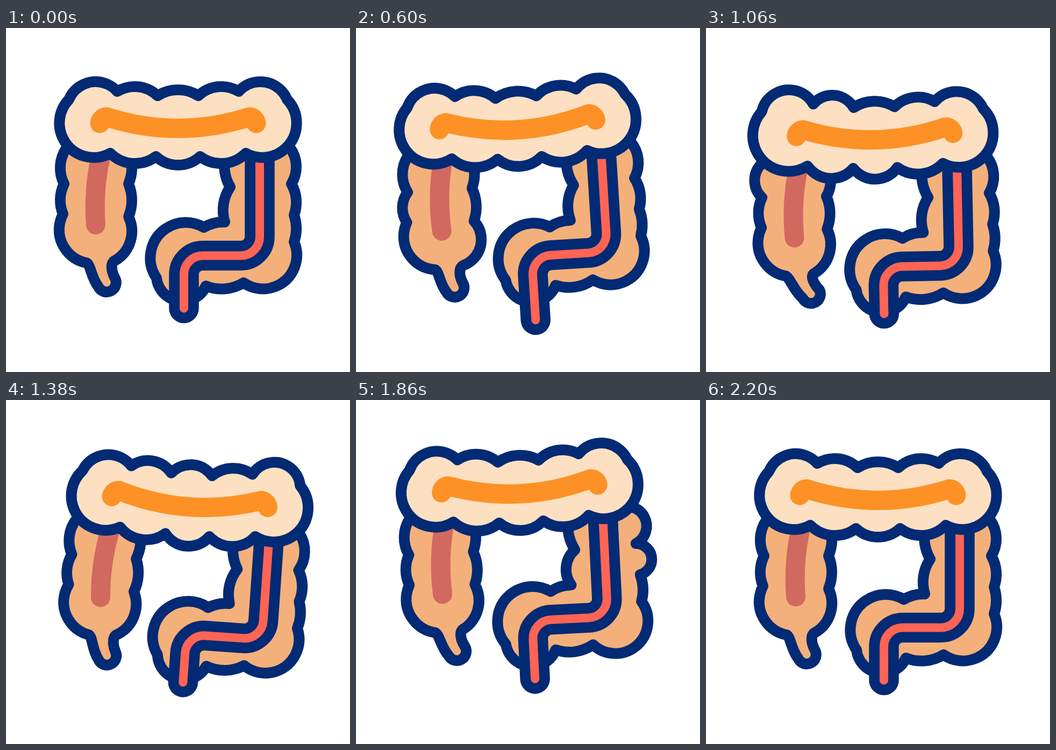
An HTML page with a canvas that plays this animation: 640 px wide and 640 px high, repeating every 2400 ms.

```html
<!DOCTYPE html>
<html lang="en">
<head>
<meta charset="utf-8">
<title>Colon</title>
<style>
html, body { margin: 0; width: 100%; height: 100%; overflow: hidden; background: #fff; }
canvas { display: block; width: 640px; height: 640px; }
</style>
</head>
<body>
<canvas id="stage"></canvas>
<script>
const LOOP = 2400, STEP = 20;
const NAVY = '#032a74', FLESH = '#f4b07a', CREAM = '#fde0c1';
const ORANGE = '#fd9125', WINE = '#d1695f', RED = '#ff6455';

const canvas = document.getElementById('stage');
const ctx = canvas.getContext('2d');
const dpr = window.devicePixelRatio || 1;
canvas.width = canvas.height = 640 * dpr;

// Keyed motion: [time, value] pairs, eased in and out
const TILT = [[220, 0], [795, -4.85], [1390, 4], [1835, -2.9], [2200, 0]];
const BOB = [[220, 0], [520, 1], [1130, 22], [1820, -13], [2200, 0]];
const TUBE_END = [[220, 0], [740, 27.5], [1180, 6.5], [1380, 3], [1840, -2], [2200, 0]];
const SWING = [[220, 0], [560, -3], [1040, 8.5], [1380, -1], [1800, 1], [2200, 0]];

function keyed(keys, t) {
  if (t <= keys[0][0]) return keys[0][1];
  for (let i = 1; i < keys.length; i++) {
    const [t0, a] = keys[i - 1], [t1, b] = keys[i];
    if (t <= t1) {
      const u = (t - t0) / (t1 - t0);
      return a + (b - a) * u * u * (3 - 2 * u);
    }
  }
  return keys[keys.length - 1][1];
}

// Swelling of one pouch, centred on a moment
function swell(t, mid, half, size) {
  const u = (t - mid) / half;
  return Math.abs(u) < 1 ? size * Math.cos(u * Math.PI / 2) ** 2 : 0;
}

// Pen that chains arcs, each through an apex pushed outward by a swelling
function pen(x, y) {
  const path = new Path2D();
  path.moveTo(x, y);
  return {
    path,
    pouch(ax, ay, ex, ey, out = 0) {
      const mx = (x + ex) / 2, my = (y + ey) / 2;
      const d = Math.hypot(ax - mx, ay - my);
      const px = ax + (ax - mx) / d * out, py = ay + (ay - my) / d * out;
      const s1 = x * x + y * y, s2 = px * px + py * py, s3 = ex * ex + ey * ey;
      const det = 2 * (x * (py - ey) + px * (ey - y) + ex * (y - py));
      const cx = (s1 * (py - ey) + s2 * (ey - y) + s3 * (y - py)) / det;
      const cy = (s1 * (ex - px) + s2 * (x - ex) + s3 * (px - x)) / det;
      path.arc(cx, cy, Math.hypot(x - cx, y - cy),
        Math.atan2(y - cy, x - cx), Math.atan2(ey - cy, ex - cx), det < 0);
      [x, y] = [ex, ey];
      return this;
    },
    curve(a, b, c, d, ex, ey) {
      path.bezierCurveTo(a, b, c, d, ex, ey);
      [x, y] = [ex, ey];
      return this;
    }
  };
}

function line(path, color, width) {
  ctx.strokeStyle = color;
  ctx.lineWidth = width;
  ctx.stroke(path);
}

function body(path, color) {
  path.closePath();
  ctx.fillStyle = color;
  ctx.fill(path);
  line(path, NAVY, 20);
}

function ascending(t) {
  const lobe = swell(t, 600, 430, 6);
  const s = keyed(SWING, t), lift = -Math.abs(s) * 0.3;
  const p = pen(230, 234)
    .pouch(234, 262, 228, 290, swell(t, 950, 430, 3))
    .pouch(234, 321, 228, 351)
    .pouch(231.3, 397, 204, 432, lobe)
    .curve(195, 435, 194 + s / 2, 449, 203 + s, 466 + lift)
    .pouch(192 + s, 490.5 + lift, 171.5 + s, 481 + lift)
    .curve(158 + s * 0.6, 463, 158, 442, 150, 437)
    .pouch(107.6, 407, 106 - lobe / 2, 346, lobe / 2)
    .pouch(101, 320, 108, 290, swell(t, 600, 430, 5))
    .pouch(101, 257, 112, 224, swell(t, 950, 430, 7));
  body(p.path, FLESH);
  line(new Path2D('M177 235Q162 300 167 366'), WINE, 36);
}

function descending(t) {
  const p = pen(528, 222)
    .pouch(540, 258, 531, 290, swell(t, 1820, 340, 13))
    .pouch(540, 321, 536, 348, swell(t, 1850, 340, 19))
    .pouch(540, 373, 536, 398)
    .pouch(517.5, 471.5, 442, 474, swell(t, 1890, 305, 10))
    .pouch(404, 485.5, 372, 480)
    .pouch(333, 508, 280, 465)
    .pouch(286.5, 382.5, 368, 371, swell(t, 1900, 300, 3))
    .pouch(387, 363, 407, 361)
    .pouch(404, 333, 417, 296, swell(t, 1850, 340, 6))
    .pouch(407, 266, 408, 238);
  body(p.path, FLESH);
}

function tube(end) {
  const path = new Path2D(
    `M472 230V388.5A35 35 0 0 1 437 423.5H366A35 35 0 0 0 331 458.5V${end}`);
  line(path, NAVY, 55.5);
  line(path, RED, 16);
}

function transverse(t) {
  const left = swell(t, 980, 400, 8);
  const nx = 117 - left * 0.85, ny = 133 - left * 0.4;
  const p = pen(nx, ny)
    .pouch(164, 100, 207, 118, left * 1.3)
    .pouch(242, 109, 282, 126, swell(t, 1090, 550, 7))
    .pouch(320, 115, 358, 126, swell(t, 1370, 330, 7))
    .pouch(398, 109, 433, 118, swell(t, 1620, 230, 6))
    .pouch(476, 100, 523, 133, swell(t, 1450, 380, 8))
    .pouch(527, 216.5, 446, 233)
    .pouch(402, 252, 361, 239, swell(t, 1500, 250, 5))
    .pouch(320, 255, 279, 239, swell(t, 1220, 370, 8))
    .pouch(238, 252, 194, 233, swell(t, 1150, 330, 6))
    .pouch(113, 216.5, nx, ny, left * 0.6);
  body(p.path, CREAM);
  line(new Path2D('M174.5 177.5A13 13 0 0 1 187 165.5Q320 208 453 165.5' +
    'A13 13 0 0 1 465.5 177.5'), ORANGE, 36);
}

function draw(t) {
  ctx.setTransform(dpr, 0, 0, dpr, 0, 0);
  ctx.fillStyle = '#fff';
  ctx.fillRect(0, 0, 640, 640);
  ctx.lineCap = ctx.lineJoin = 'round';
  const bob = keyed(BOB, t);
  ctx.translate(320, 490 + bob);
  ctx.rotate(keyed(TILT, t) * Math.PI / 180);
  ctx.translate(-320, -490);
  ascending(t);
  descending(t);
  tube(521.5 + keyed(TUBE_END, t) - bob);
  transverse(t);
}

const start = performance.now();
function tick() {
  const t = (performance.now() - start) % LOOP;
  draw(Math.floor(t / STEP) * STEP);
  requestAnimationFrame(tick);
}
tick();
</script>
</body>
</html>
```
